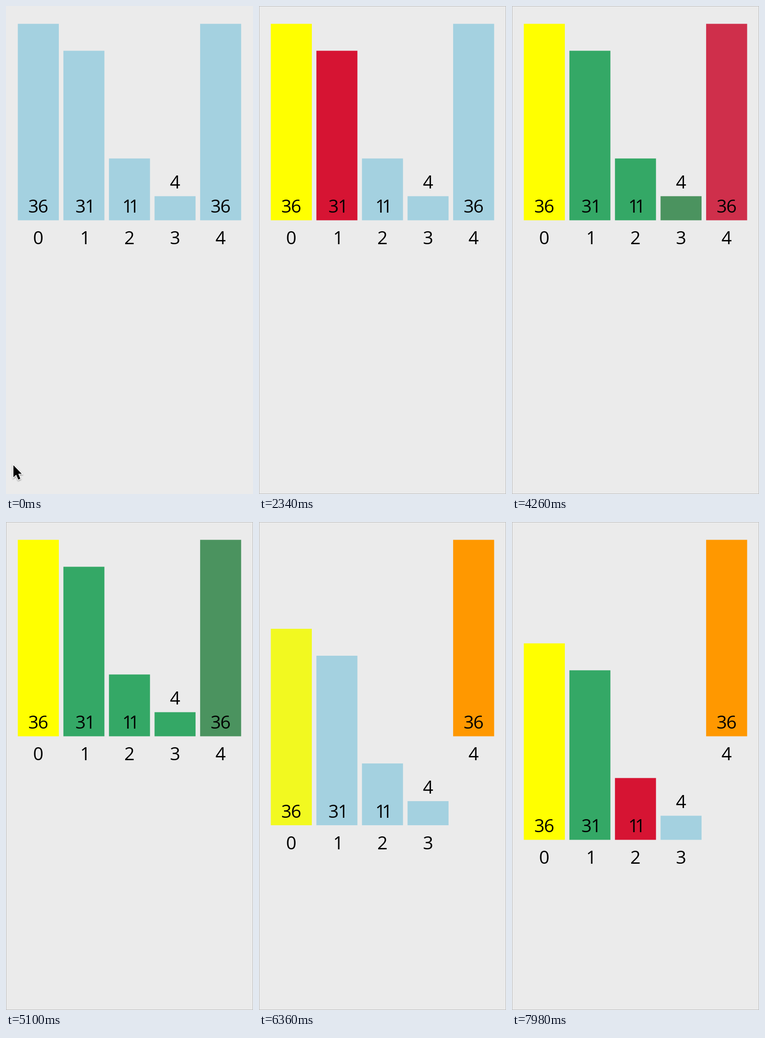
An HTML page with a canvas for the animation above (8 s loop, 533 by 1051 pixels).

```html
<!DOCTYPE html>
<html lang="en">
<head>
<meta charset="utf-8">
<title>Quick sort</title>
<style>
  html, body { margin: 0; height: 100%; overflow: hidden; background: #ebebeb; }
  canvas { display: block; }
</style>
</head>
<body>
<canvas id="stage" width="533" height="1051"></canvas>
<script>
const ctx = document.getElementById('stage').getContext('2d');

const LOOP = 8000, FADE = 180;
const BLUE = [164, 209, 224], YELLOW = [255, 255, 0], RED = [214, 20, 51],
      GREEN = [52, 168, 102], ORANGE = [255, 152, 0];
const BASE = 461.5, UNIT = 11.6, BAR_WIDTH = 88.5, DROP = 223;

// Sorting steps, in ms
const PIVOT = 1200, SWAP = 5400, PLACED = 5820, NEXT_PIVOT = 6240;
const compareAt = i => 1620 + 840 * (i - 1);
const compareAgainAt = i => 6660 + 840 * (i - 1);

const slotX = i => 25.5 + 98.35 * i;

const firstPass = i => [[compareAt(i), RED], [compareAt(i + 1), GREEN]];

// The two bars of height 36 trade places, so the last one becomes the next pivot.
const bars = [
  { value: 36, slot: 0, swapTo: 4, colors: [[PIVOT, YELLOW], [PLACED, ORANGE]] },
  { value: 31, slot: 1, colors: [...firstPass(1), [PLACED, BLUE],
      [compareAgainAt(1), RED], [compareAgainAt(2), GREEN]] },
  { value: 11, slot: 2, colors: [...firstPass(2), [PLACED, BLUE], [compareAgainAt(2), RED]] },
  { value: 4, slot: 3, colors: [...firstPass(3), [PLACED, BLUE]] },
  { value: 36, slot: 4, swapTo: 0, colors: [...firstPass(4), [PLACED, BLUE], [NEXT_PIVOT, YELLOW]] }
];

const mix = (a, b, p) => a + (b - a) * p;

// Cubic ease in and out, starting at the given time
function progress(t, start) {
  const p = Math.min(1, Math.max(0, (t - start) / FADE));
  return p < 0.5 ? 4 * p ** 3 : 1 - 4 * (1 - p) ** 3;
}

function colorAt(steps, t) {
  const rgb = steps.reduce((color, [start, next]) =>
    color.map((c, k) => mix(c, next[k], progress(t, start))), BLUE);
  return `rgb(${rgb.map(Math.round)})`;
}

// Centred digits with a narrow 1
function drawNumber(number, x, y) {
  const digits = [...String(number)];
  const advance = d => d === '1' ? 14.5 : 21;
  x -= digits.reduce((sum, d) => sum + advance(d), 0) / 2;
  for (const d of digits) {
    ctx.fillText(d, x + advance(d) / 2 + (d === '1' ? 3 : 0), y);
    x += advance(d);
  }
}

function drawCursor() {
  ctx.save();
  ctx.translate(16, 989);
  const arrow = new Path2D('M0 0V26L6 20.5L10.5 31L15 29L10.5 18.5H18Z');
  ctx.shadowColor = 'rgba(0,0,0,.4)';
  ctx.shadowBlur = 3;
  ctx.shadowOffsetY = 1.5;
  ctx.strokeStyle = '#fff';
  ctx.lineWidth = 3;
  ctx.stroke(arrow);
  ctx.shadowColor = 'transparent';
  ctx.fillStyle = '#000';
  ctx.fill(arrow);
  ctx.restore();
}

function draw(t) {
  ctx.fillStyle = '#ebebeb';
  ctx.fillRect(0, 0, 533, 1051);

  const drop = DROP * progress(t, NEXT_PIVOT);
  const placed = bars.map(bar => {
    const target = bar.swapTo ?? bar.slot;
    return {
      ...bar,
      x: mix(slotX(bar.slot), slotX(target), progress(t, SWAP)),
      bottom: BASE + (target < 4 ? drop : 0),
      height: bar.value * UNIT + 5.5
    };
  });

  for (const { x, bottom, height, colors } of placed) {
    ctx.fillStyle = colorAt(colors, t);
    ctx.fillRect(x, bottom - height, BAR_WIDTH, height);
  }

  ctx.fillStyle = '#000';
  ctx.font = '500 39px "Open Sans", "Noto Sans", sans-serif';
  ctx.textAlign = 'center';
  for (const { x, bottom, height, value } of placed) {
    const y = height > 60 ? bottom - 16.5 : bottom - height - 16.5;
    drawNumber(value, x + BAR_WIDTH / 2, y);
  }
  for (let i = 0; i < 5; i++) {
    drawNumber(i, slotX(i) + BAR_WIDTH / 2, BASE + 51.5 + (i < 4 ? drop : 0));
  }

  if (t < 60) drawCursor();
  if (t >= 360) {
    ctx.strokeStyle = '#bdbdbd';
    ctx.lineWidth = 1;
    ctx.strokeRect(0.5, 0.5, 532, 1050);
  }
}

const start = performance.now();
function tick() {
  draw((performance.now() - start) % LOOP);
  requestAnimationFrame(tick);
}
tick();
</script>
</body>
</html>
```
